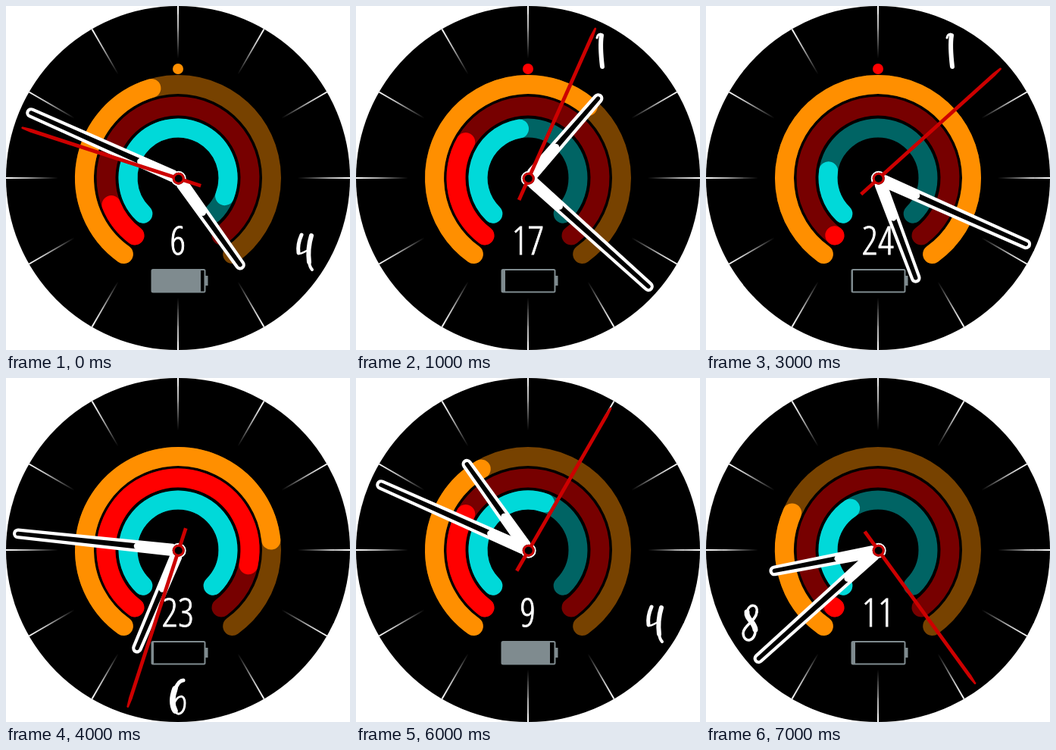
An HTML page for the animation above (8000 ms loop, 454 px wide and 454 px high).

```html
<!DOCTYPE html>
<html lang="en">
<head>
<meta charset="utf-8">
<title>Watch face</title>
<style>
  html, body { margin: 0; width: 100%; height: 100%; overflow: hidden; background: #fff; }
  svg { display: block; width: 454px; height: 454px; }
  .line { fill: none; stroke-linecap: round; stroke-linejoin: round; }
  .day {
    font: 300 52px "Open Sans Condensed Light", "Open Sans Condensed", "Open Sans", sans-serif;
    font-stretch: 75%;
    letter-spacing: .5px;
    text-anchor: middle;
    fill: #fff;
    stroke: #fff;
    stroke-width: .9px;
  }
</style>
</head>
<body>
<svg viewBox="0 0 454 454">
  <defs>
    <linearGradient id="fade" gradientUnits="userSpaceOnUse" x1="0" y1="-227" x2="0" y2="-158">
      <stop offset="0" stop-color="#fff"/>
      <stop offset=".4" stop-color="#bbb"/>
      <stop offset="1" stop-color="#000"/>
    </linearGradient>
  </defs>
  <circle cx="227" cy="227" r="227"/>
  <g transform="translate(227 227)">
    <g id="ticks"></g>
    <g id="rings"></g>
    <circle id="dot" cy="-144" r="7"/>
    <g id="numeral" class="line" stroke="#fff"></g>
  </g>
  <text id="day" class="day" x="227" y="328"></text>
  <g fill="#7f8b8f">
    <rect x="192.5" y="348" width="70" height="29.5" rx="1.5" fill="#000" stroke="#7f8b8f" stroke-width="2"/>
    <rect id="charge" x="193" y="348" height="29.5"/>
    <rect x="262" y="356" width="4.5" height="13"/>
  </g>
  <g transform="translate(227.7 227.7)">
    <g id="hour"></g>
    <g id="minute"></g>
    <circle r="9" fill="#000" stroke="#fff" stroke-width="2"/>
    <g id="second">
      <path d="M-1.4-217Q0-219 1.4-217L2.4-205V31H-2.4V-205Z" fill="#cd0000"/>
    </g>
    <circle r="6.5" fill="#000" stroke="#cd0000" stroke-width="3"/>
  </g>
</svg>
<script>
const $ = id => document.getElementById(id);

function add(parent, tag, attrs) {
  const el = document.createElementNS('http://www.w3.org/2000/svg', tag);
  for (const k in attrs) el.setAttribute(k, attrs[k]);
  return parent.appendChild(el);
}

const polar = (r, deg) => {
  const a = deg * Math.PI / 180;
  return [r * Math.sin(a), -r * Math.cos(a)];
};

// Clockwise arc; angles run from twelve o'clock.
function arc(r, from, to) {
  const sweep = Math.max((to - from + 360) % 360, 0.1);
  return `M${polar(r, from)}A${r} ${r} 0 ${sweep > 180 ? 1 : 0} 1 ${polar(r, from + sweep)}`;
}

const RINGS = [
  { r: 123.5, gap: 35.5, on: '#ff8f00', off: '#774200' },
  { r: 95, gap: 36.9, on: '#ff0000', off: '#770000' },
  { r: 66, gap: 44.4, on: '#00d9d9', off: '#006464' }
];

// Brush strokes of each hour numeral: [width, path].
const NUMERALS = {
  1: [[3, 'M-6-17Q-5-22-1-22'], [6, 'M0-20C-2-8-1 4 1 21']],
  2: [[3, 'M-5-12C-9-17 1-25 8-22'], [5, 'M8-22C14-18 9-6 3 3'],
      [3, 'M3 3C-2 11-7 17-9 22C-4 18 2 26 9 23']],
  4: [[5, 'M-5-22C-9-13-10-5-9 2'], [2.5, 'M-9 2C-6 5-1-1 5-2'],
      [6, 'M8-21C4-8 4 6 5 14'], [4, 'M5 14Q6 21 9 24']],
  6: [[5, 'M7-22C2-22-1-17-4-10'], [7.5, 'M-4-11C-8 0-8 11-4 18'],
      [3, 'M-4 19C0 26 9 21 9 8C9-4 0-3-5 8']],
  8: [[3.5, 'M8-15C10-26-2-27-5-15'], [7, 'M-5-15C-6-6 5-2 6 8'],
      [3.5, 'M6 8C7 24-9 27-10 13C-10 3 7-3 8-15']]
};

const STATES = [
  { time: [4, 49, 48], ends: [343.5, 248, 111], dot: '#ff8f00', num: 4, day: 6, charge: 64 },
  { time: [1, 22, 4], ends: [40, 300, 350], dot: '#ff0000', num: 1, day: 17, charge: 4 },
  { time: [11, 56, 51], ends: [116, 54, 63], dot: '#770000', num: 2, day: 5, charge: 5 },
  { time: [5, 19, 8], ends: [144.5, 216.9, 278], dot: '#ff0000', num: 1, day: 24, charge: 1 },
  { time: [6, 46, 33], ends: [84, 102, 135.6], dot: 'none', num: 6, day: 23, charge: 2 },
  { time: [9, 34, 52], ends: [313, 270.6, 228], dot: '#ff0000', num: 2, day: 14, charge: 63 },
  { time: [10, 49, 5], ends: [330, 300, 20], dot: 'none', num: 4, day: 9, charge: 63 },
  { time: [8, 38, 24], ends: [293.4, 218, 326.5], dot: 'none', num: 8, day: 11, charge: 4 }
];

const ticks = Array.from({ length: 12 }, (_, i) => add($('ticks'), 'path', {
  d: 'M-1-227H1L.8-158H-.8Z', fill: 'url(#fade)', transform: `rotate(${i * 30})`
}));

const fills = RINGS.map(({ r, gap, on, off }) => {
  const style = { class: 'line', 'stroke-width': 25 };
  add($('rings'), 'path', { ...style, stroke: off, d: arc(r, 180 + gap, 180 - gap) });
  return add($('rings'), 'path', { ...style, stroke: on });
});

function buildHand(id, len) {
  add($(id), 'path', {
    d: `M-6-8L-4.8${-len}A4.8 4.8 0 0 1 4.8${-len}L6-8Z`,
    fill: '#000', stroke: '#fff', 'stroke-width': 4.2, 'stroke-linejoin': 'round'
  });
  add($(id), 'path', { d: 'M-6-8L-5-56Q0-63 5-56L6-8Z', fill: '#fff' });
}
buildHand('hour', 140);
buildHand('minute', 213);

function show({ time: [h, m, s], ends, dot, num, day, charge }) {
  const turn = (id, deg) => $(id).setAttribute('transform', `rotate(${deg})`);
  turn('hour', h * 30 + m / 2);
  turn('minute', m * 6);
  turn('second', s * 6);

  RINGS.forEach(({ r, gap }, i) => fills[i].setAttribute('d', arc(r, 180 + gap, ends[i])));
  ticks.forEach((t, i) => t.setAttribute('visibility', i === num ? 'hidden' : 'visible'));
  $('dot').setAttribute('fill', dot);
  $('day').textContent = day;
  $('charge').setAttribute('width', charge);

  const g = $('numeral');
  g.replaceChildren();
  g.setAttribute('transform', `translate(${polar(194, num * 30)})`);
  for (const [w, d] of NUMERALS[num]) add(g, 'path', { d, 'stroke-width': w });
}

let current = -1;
const start = performance.now();
function tick() {
  const i = Math.floor((performance.now() - start) / 1000) % STATES.length;
  if (i !== current) show(STATES[current = i]);
  requestAnimationFrame(tick);
}
tick();
</script>
</body>
</html>
```
